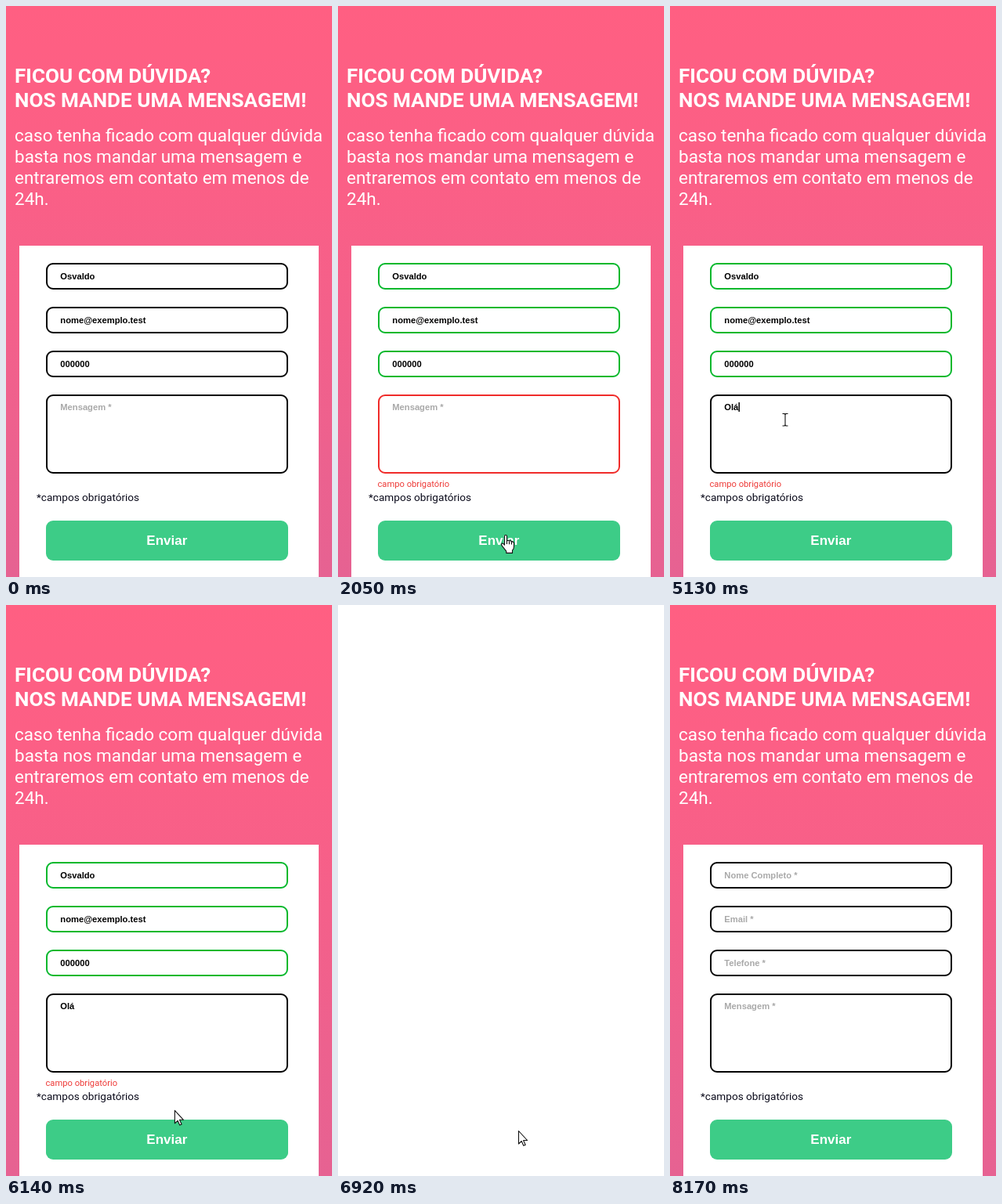
Animation, 416 px wide and 729 px high, one loop 8780 ms. Source, as an HTML page:

```html
<!DOCTYPE html>
<html lang="pt">
<head>
<meta charset="utf-8">
<title>Contato</title>
<style>
  html, body { margin: 0; width: 100%; height: 100%; overflow: hidden; background: #fff; }
  svg { display: block; width: 416px; height: 729px; }
  text { white-space: pre; }
  .title { font: 700 26.1px Roboto, sans-serif; fill: #fff; }
  .lead { font: 400 22.5px Roboto, sans-serif; fill: #fff; }
  .value { font: 700 11.2px "Liberation Sans", Arial, sans-serif; }
  .send { font: 700 17px "Liberation Sans", Arial, sans-serif; fill: #fff; text-anchor: middle; }
  .note { font: 400 13.6px Roboto, sans-serif; fill: #0c0c1c; }
  .error { font: 400 11.2px Roboto, sans-serif; fill: #ee3b38; }
  .field { fill: #fff; stroke-width: 2; }
  .cursor path { stroke: #111; stroke-width: 1.1; stroke-linejoin: round; fill: #fff; }
  .cursor .line { fill: none; }
</style>
</head>
<body>
<svg viewBox="0 0 416 729">
  <defs>
    <linearGradient id="sky" x1="0" y1="0" x2="0" y2="1">
      <stop offset="0" stop-color="#ff5f82"/>
      <stop offset=".3" stop-color="#fb5f86"/>
      <stop offset="1" stop-color="#e66292"/>
    </linearGradient>
  </defs>
  <rect width="416" height="729" fill="#fff"/>
  <g id="page">
    <rect width="416" height="729" fill="url(#sky)"/>
    <text class="title" x="11" y="98">FICOU COM DÚVIDA?</text>
    <text class="title" x="11" y="129">NOS MANDE UMA MENSAGEM!</text>
    <text class="lead" x="11" y="173">caso tenha ficado com qualquer dúvida</text>
    <text class="lead" x="11" y="200">basta nos mandar uma mensagem e</text>
    <text class="lead" x="11" y="227">entraremos em contato em menos de</text>
    <text class="lead" x="11" y="254">24h.</text>
    <rect x="17" y="306" width="382" height="423" fill="#fff"/>
    <g id="form"></g>
    <rect id="caret" y="506" width="1.5" height="12"/>
    <text id="error" class="error" x="50.5" y="614">campo obrigatório</text>
    <text class="note" x="39" y="632">*campos obrigatórios</text>
    <rect x="51" y="657" width="309" height="51" rx="9" fill="#3dcc87"/>
    <text class="send" x="205.3" y="688">Enviar</text>
  </g>
  <g id="cursor" class="cursor">
    <g id="arrow"><path d="M.5 .5V17L4.2 13.5 6.8 19.3 9.2 18.2 6.6 12.5H11.6Z"/></g>
    <g id="hand">
      <path d="M-1.5 2a1.5 1.5 0 0 1 3 0V8q1.5-1.5 3 0q1.6-1 3 .6q2.8-.2 3 2.4V15q0 3-2 5V23.4H.8V21.2L-4.6 14.4q-2-3.2.4-3.4q1.3 0 2.7 2.2Z"/>
      <path class="line" d="M1.5 8v4M4.5 8.5v3.7M7.5 9v3.4"/>
    </g>
    <g id="beam"><path class="line" d="M-3.5-7.5H-1L0-6.5 1-7.5H3.5M0-6.5V7M-3.5 8H-1L0 7 1 8H3.5"/></g>
  </g>
</svg>
<script>
const LOOP = 8780;
const NS = "http://www.w3.org/2000/svg";
const el = id => document.getElementById(id);
const show = (id, on) => el(id).setAttribute("visibility", on ? "inherit" : "hidden");
const clamp = v => Math.max(0, Math.min(1, v));
const mix = (a, b, p) => a + (b - a) * p;
const within = (t, a, b) => t >= a && t < b;

const BLACK = [0, 0, 0], GREEN = [4, 184, 44], RED = [240, 44, 42];
const blend = (a, b, p) => `rgb(${a.map((v, i) => Math.round(mix(v, b[i], p)))})`;

function add(tag, attrs) {
  const node = document.createElementNS(NS, tag);
  for (const k in attrs) node.setAttribute(k, attrs[k]);
  return el("form").appendChild(node);
}

const fields = [
  ["Nome Completo *", "Osvaldo", 328, 34, 349],
  ["Email *", "nome@exemplo.test", 384, 34, 405],
  ["Telefone *", "000000", 440, 34, 461],
  ["Mensagem *", "", 496, 101, 516]
].map(([hint, value, y, h, base]) => ({
  hint, value,
  box: add("rect", { class: "field", x: 52, y: y + 1, width: 307, height: h - 2, rx: 8 }),
  label: add("text", { class: "value", x: 69.3, y: base })
}));

// pointer path: time, x, y
const path = [
  [600, 372, 735], [650, 357, 720], [800, 318, 697], [950, 284, 682],
  [1100, 256, 677], [1390, 214, 675],
  [2780, 214, 675], [3000, 188, 622], [3240, 147, 528],
  [5580, 147, 528], [5900, 196, 612], [6260, 230, 671],
  [7610, 230, 671], [7860, 290, 694], [8120, 367, 724]
];

function pointer(t) {
  let i = 0;
  while (i < path.length - 2 && t >= path[i + 1][0]) i++;
  const [t0, x0, y0] = path[i], [t1, x1, y1] = path[i + 1];
  const step = Math.floor((t - t0) / 50) * 50;
  const p = clamp(step / (t1 - t0));
  return [mix(x0, x1, p), mix(y0, y1, p)];
}

function shape(t, x, y) {
  if (within(t, 6760, 7280)) return "arrow";
  if (x >= 51 && x < 360 && y >= 657 && y < 708) return "hand";
  if (x >= 51 && x < 360 && y >= 496 && y < 597) return "beam";
  return "arrow";
}

// border changes in three short steps
const fade = (t, start) => clamp((Math.floor((t - start) / 50) + 1) / 3);

function borders(t) {
  if (t >= 6920) return [blend(BLACK, BLACK, 0), blend(BLACK, BLACK, 0)];
  const checked = fade(t, 1950);
  const top = blend(BLACK, GREEN, checked);
  if (t >= 6660) return [top, blend(BLACK, GREEN, fade(t, 6660))];
  if (t >= 3350) return [top, blend(RED, BLACK, fade(t, 3300))];
  return [top, blend(BLACK, RED, checked)];
}

const typed = t => t < 4560 || t >= 6920 ? "" : t < 4730 ? "O" : t < 5130 ? "Ol" : "Olá";

function draw(t) {
  show("page", !within(t, 6920, 6990));
  const [top, bottom] = borders(t);
  fields.forEach((f, i) => {
    const last = i === 3;
    const value = last ? typed(t) : t < 6920 ? f.value : "";
    f.box.setAttribute("stroke", last ? bottom : top);
    f.label.textContent = value || f.hint;
    f.label.setAttribute("fill", value ? "#000" : "#a9a9a9");
  });

  const message = typed(t);
  const width = message ? fields[3].label.getComputedTextLength() : 0;
  el("caret").setAttribute("x", 69.4 + width);
  show("caret", within(t, 3350, 3900) || within(t, 4460, 5630) || within(t, 6160, 6660));
  show("error", within(t, 1950, 6660));

  const [x, y] = pointer(t), kind = shape(t, x, y);
  show("cursor", within(t, 650, 8170));
  el("cursor").setAttribute("transform", `translate(${x} ${y})`);
  for (const id of ["arrow", "hand", "beam"]) show(id, id === kind);
}

const begin = performance.now();
function tick() {
  draw((performance.now() - begin) % LOOP);
  requestAnimationFrame(tick);
}
tick();
</script>
</body>
</html>
```
